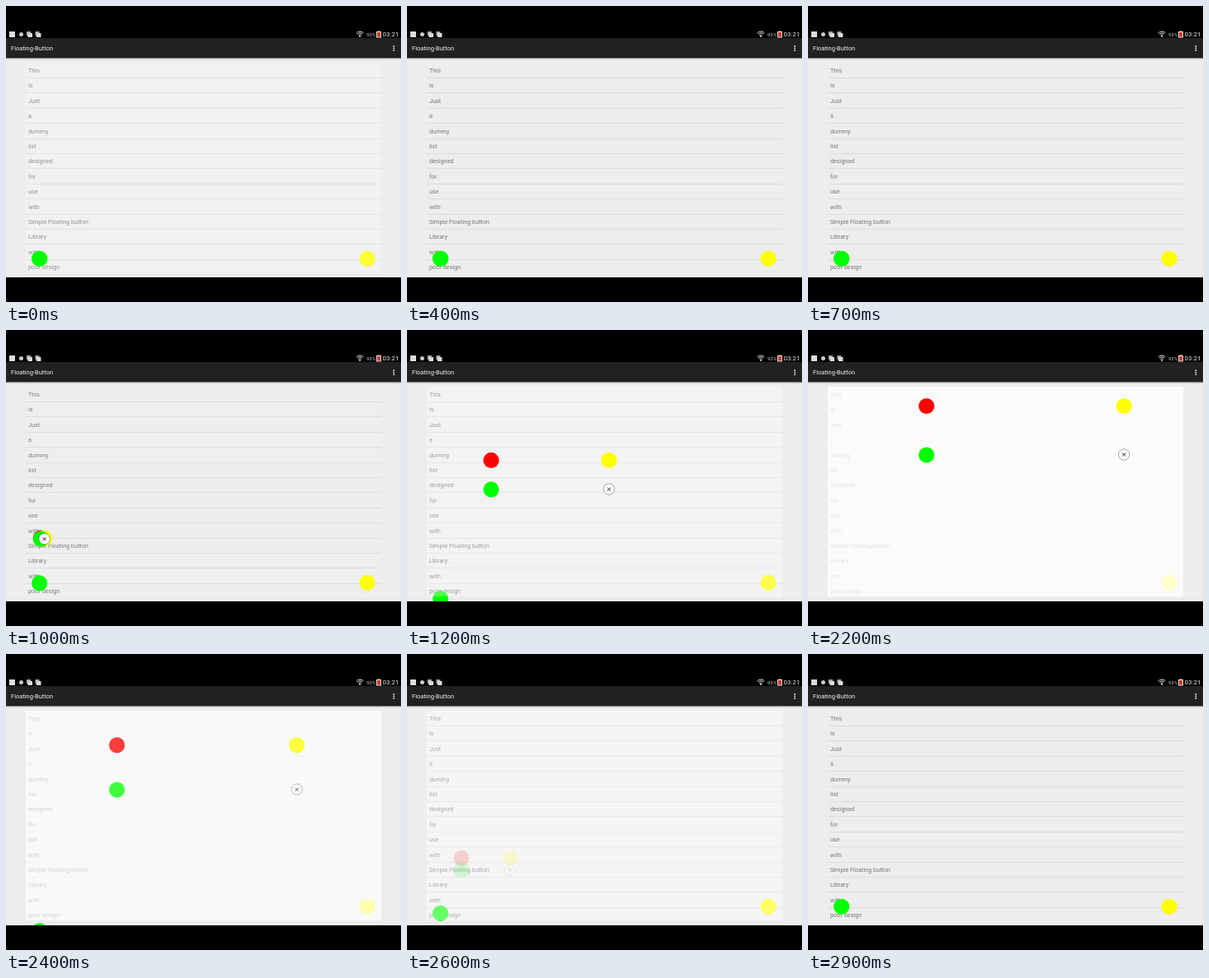
Recreate the animation shown at these times as an HTML page with a canvas. Size 480x360 px, loop 3 s.

```html
<!DOCTYPE html>
<html lang="en">
<head>
<meta charset="utf-8">
<title>Floating-Button</title>
<style>
html, body { margin: 0; width: 100%; height: 100%; overflow: hidden; background: #000; }
canvas { display: block; }
</style>
</head>
<body>
<canvas id="stage" width="480" height="360"></canvas>
<script>
const ctx = document.getElementById('stage').getContext('2d');
const LOOP = 3000, OPEN = 965, CLOSE = 2320, MOVE = 420;
const rows = ['This', 'is', 'Just', 'a', 'dummy', 'list', 'designed', 'for', 'use', 'with',
  'Simple Floating button', 'Library', 'with', 'poor design'];
const items = [
  { x: 144, y: 92.5, color: '#f00' },
  { x: 384, y: 92.5, color: '#ff0' },
  { x: 144, y: 152, color: '#0f0' },
  { x: 384, y: 151.5 }
];

const progress = (t, start, length) => Math.min(1, Math.max(0, (t - start) / length));
const ease = u => (1 - Math.cos(Math.PI * u)) / 2;

function rect(x, y, w, h, color) {
  ctx.fillStyle = color;
  ctx.fillRect(x, y, w, h);
}

function disc(x, y, r, color) {
  ctx.fillStyle = color;
  ctx.beginPath();
  ctx.arc(x, y, r, 0, 2 * Math.PI);
  ctx.fill();
}

function line(color, width, ...points) {
  ctx.strokeStyle = color;
  ctx.lineWidth = width;
  ctx.beginPath();
  for (let i = 0; i < points.length; i += 4) {
    ctx.moveTo(points[i], points[i + 1]);
    ctx.lineTo(points[i + 2], points[i + 3]);
  }
  ctx.stroke();
}

function text(string, x, y, size, color) {
  ctx.font = size + 'px Roboto, sans-serif';
  ctx.textBaseline = 'alphabetic';
  ctx.fillStyle = color;
  ctx.fillText(string, x, y);
}

function drawBars() {
  rect(0, 0, 480, 39, '#000');
  rect(0, 330, 480, 30, '#000');
  rect(0, 39, 480, 24, '#212121');
  rect(0, 63, 480, 1, '#8a8a8a');
  rect(0, 64, 480, 1, '#d2d2d2');
  text('Floating-Button', 6, 54, 7.5, '#f4f4f4');
  for (const y of [49, 51.5, 54]) disc(471.3, y, 0.9, '#eee');

  rect(4, 31, 7, 7, '#ddd');
  disc(18.5, 34.5, 2.5, '#ccc');
  for (const x of [25, 35.5]) {
    rect(x, 31, 5, 5, '#aaa');
    rect(x + 1.5, 33, 5.5, 5, '#ddd');
  }

  ctx.strokeStyle = '#ddd';
  ctx.lineWidth = 1;
  for (const r of [2, 4, 6]) {
    ctx.beginPath();
    ctx.arc(430, 37, r, -Math.PI * 0.76, -Math.PI * 0.24);
    ctx.stroke();
  }
  disc(430, 37, 1, '#ddd');
  text('93%', 438, 37, 6, '#ccc');
  rect(451.5, 30.5, 3, 1, '#ddd');
  rect(450, 31, 6, 7.5, '#ddd');
  rect(451, 32, 4, 5.5, '#d43a2a');
  text('03:21', 457.5, 37.3, 8, '#eee');
}

function drawList() {
  rect(0, 63, 480, 267, '#ededed');
  rows.forEach((row, i) => {
    const y = 78.2 + i * 18.4;
    text(row, 27, y + 2.7, 7.3, '#777');
    if (i < rows.length - 1) rect(24, Math.round(y + 8.8), 432, 1, '#dcdcdc');
  });
}

function drawItems(closing, spread, alpha) {
  const baseY = closing ? 299 : 256;
  ctx.globalAlpha = alpha;
  for (const item of items) {
    const x = 40.5 + (item.x - 40.5) * spread;
    const y = baseY + (item.y - baseY) * spread;
    if (item.color) {
      disc(x, y, 9.6, item.color);
    } else {
      disc(x, y, 6.7, '#fff');
      ctx.strokeStyle = '#667';
      ctx.lineWidth = 0.6;
      ctx.stroke();
      line('#222', 1, x - 2, y - 2, x + 2, y + 2, x - 2, y + 2, x + 2, y - 2);
    }
  }
  ctx.globalAlpha = 1;
}

function veilAt(t) {
  if (t < OPEN) return 0.2 * (1 - progress(t, 0, 250));
  return 0.8 * (progress(t, OPEN, 620) - progress(t, CLOSE, 560));
}

function draw(t) {
  const closing = t >= CLOSE;
  const back = progress(t, CLOSE, MOVE);
  const spread = closing ? 1 - ease(back) : ease(progress(t, OPEN, MOVE));
  const alpha = 1 - Math.min(1, back * 1.27);
  const mainY = 307.3 + 32.5 * spread;

  drawList();
  disc(439, 307.3, 9.6, '#ff0');
  disc(40.7, mainY, 9.6, '#0f0');
  rect(24, 69, 432, 255, `rgba(255,255,255,${Math.max(0, veilAt(t))})`);
  if (t < OPEN) disc(40.7, mainY, 9.6, '#0f0');
  if (t >= OPEN && alpha > 0) drawItems(closing, spread, alpha);
  drawBars();
}

function frame(now) {
  draw(now % LOOP);
  requestAnimationFrame(frame);
}
requestAnimationFrame(frame);
</script>
</body>
</html>
```
